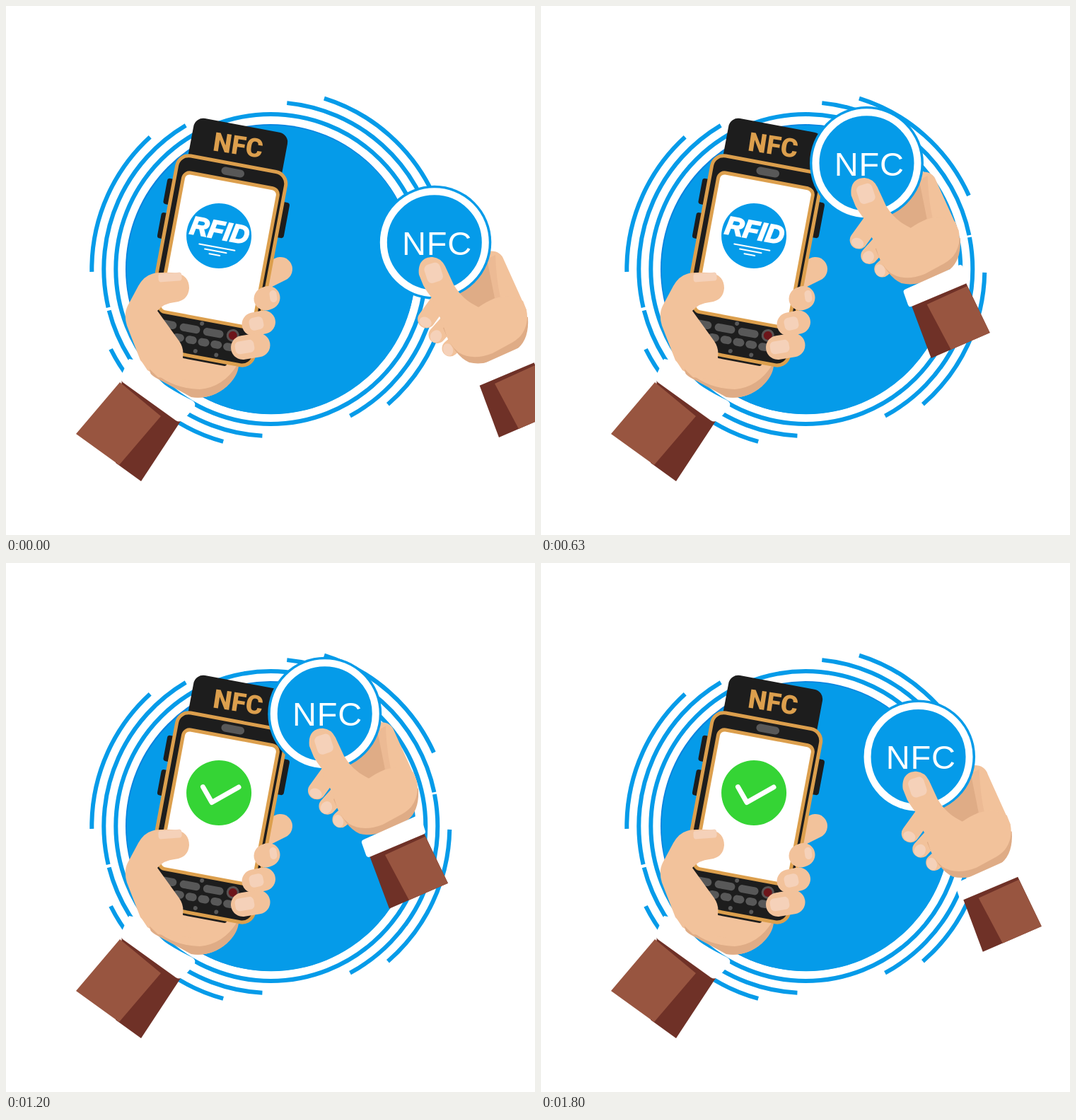
An HTML page that plays this animation: 748x748 px, repeating every 1.83 s.

```html
<!DOCTYPE html>
<html lang="en">
<head>
<meta charset="utf-8">
<title>NFC tap</title>
<style>
  html, body { margin: 0; width: 100%; height: 100%; overflow: hidden; background: #fff; }
  svg { display: block; width: 100vw; height: 100vh; }
  .blue { fill: #059be9; }
  .rings { fill: none; stroke: #059be9; stroke-width: 6; }
  .skin { fill: #f2c29b; }
  .tip { stroke: #f2c29b; stroke-linecap: round; }
  .shade { fill: #dfac86; }
  .nail { fill: #f5d1b9; }
  .ink { fill: #1d1d1d; }
  .gold { stroke: #dc9f4d; stroke-width: 5; }
  .key { fill: #585858; }
  .keys { stroke: #585858; stroke-width: 11; stroke-linecap: round; }
  .white { fill: #fff; }
  .cloth { fill: #985540; }
  .dark { fill: #6f3127; }
  .line { fill: none; stroke: #fff; stroke-linecap: round; stroke-linejoin: round; }
  text { font-family: "Liberation Sans", Arial, sans-serif; }
</style>
</head>
<body>
<svg viewBox="0 0 748 748">
  <!-- broken rings: dashes and gaps in degrees -->
  <g class="rings" transform="translate(374.300 372)">
    <circle r="219"/>
    <circle r="236" pathLength="360" transform="rotate(-11)" stroke-dasharray="72.600 31.300 72.700 1.100 72.700 36.200 72.700 .7"/>
    <circle r="253" pathLength="360" transform="rotate(1.100)" stroke-dasharray="48 56.300 48 25.700 48.500 59.800 48.300 25.400"/>
  </g>
  <circle cx="374" cy="372" r="205" fill="#0783df"/>
  <circle class="blue" cx="374.8" cy="373" r="204.2"/>

  <!-- palm and index finger behind the phone -->
  <path class="skin" d="M190 500L250 480L329 498Q331 520 312 538Q290 557 262 553L200 515Z"/>
  <path class="shade" d="M202 510Q230 541 274 542Q309 539 329 504Q330 522 312 538Q290 557 262 553L205 522Z"/>
  <path class="tip" stroke-width="34" d="M360 386L388 372"/>

  <!-- phone, upright in its own tilted frame -->
  <g transform="rotate(10.600)">
    <g class="ink">
      <rect x="292" y="104.500" width="135" height="70" rx="14"/>
      <rect x="269.500" y="197" width="14" height="37" rx="4"/>
      <rect x="270" y="246" width="14" height="37" rx="4"/>
      <rect x="432" y="200" width="14" height="51" rx="4"/>
      <rect x="300" y="425" width="100" height="18.500" rx="3"/>
    </g>
    <rect class="ink gold" x="279" y="160.300" width="156.500" height="278" rx="17"/>
    <rect class="white gold" x="291" y="184" width="136" height="200" rx="9"/>
    <text transform="translate(359 133) rotate(-2)" text-anchor="middle" y="13"
      style="font:800 37px Roboto,sans-serif" fill="#dc9f4d">NFC</text>
    <rect class="key" x="342" y="166.500" width="33" height="11" rx="5.500"/>
    <path class="keys" stroke-dasharray="18 15.700" d="M296.800 400.400H382.500"/>
    <path class="keys" stroke-dasharray="5 13.100" d="M323.500 416H402"/>
    <g class="key">
      <circle cx="355" cy="390.300" r="3"/><circle cx="353" cy="430.400" r="3"/><circle cx="383" cy="430.400" r="3"/>
    </g>
    <circle cx="401" cy="399" r="7.500" fill="#6d151a" stroke="#595353" stroke-width="3"/>

    <g id="idle">
      <circle class="blue" cx="355.700" cy="264" r="46"/>
      <text x="355.500" y="268.500" text-anchor="middle" font-size="36" font-weight="bold"
        font-style="italic" fill="#fff" stroke="#fff" stroke-width="2">RFID</text>
      <path class="line" stroke-width="2" d="M330.500 280.400h51M339.500 286h31M347 291.400h15"/>
    </g>
    <g id="done">
      <circle cx="355.700" cy="264" r="46" fill="#35d435"/>
      <path class="line" stroke-width="7" d="M332 260L348.300 279.200L381.700 251"/>
    </g>
  </g>

  <!-- left hand in front of the phone -->
  <path class="skin" d="M206 379Q213 376 235 377C252 378 259 386 259 399C258 412 250 418 238 419Q224 420 214 431L245 474Q252 484 250 497L262 530L215 525L190 501L171 452Q166 436 172 424L187 396Q195 382 206 379Z"/>
  <rect class="nail" x="215.500" y="377.500" width="33" height="12" rx="4" transform="rotate(-4 232 383.500)"/>
  <g class="tip">
    <path stroke-width="33" d="M367 414L371 412.500"/>
    <path stroke-width="33" d="M350 450L364.500 447"/>
    <path stroke-width="34" d="M335 483L356.500 479.500"/>
  </g>
  <g class="nail">
    <rect x="373" y="402" width="10" height="17" rx="5" transform="rotate(-8 378 411)"/>
    <rect x="344" y="440" width="20" height="18" rx="6" transform="rotate(-12 354 449)"/>
    <rect x="324" y="473" width="27" height="18" rx="6" transform="rotate(-10 338 482)"/>
  </g>
  <path class="dark" d="M164 526L247 587L191 672L155 646Z"/>
  <path class="cloth" d="M161 532L219 580L160 649L99 605Z"/>
  <path class="white" d="M174 499Q186 500 195 511Q220 537 262 557Q270 561 266 568L252 584Q246 590 240 586L165 532Q161 528 163 522Z"/>

  <!-- right hand with the tag -->
  <g id="tag">
    <path class="skin" d="M675 348Q698 342 704 359L736 430L712 450L640 425L640 400Z"/>
    <path fill="#ecba94" d="M676 360L692 352Q693 385 699 412L668 426Z"/>
    <path class="shade" d="M681 363L691 413L668 426L636 408Z"/>
    <g class="blue" transform="translate(605.800 334.300)">
      <circle r="80.500"/>
      <circle r="72" stroke="#fff" stroke-width="10"/>
    </g>
    <text x="560" y="351.500" font-size="47" letter-spacing=".8" fill="#fff">NFC</text>
    <g class="tip">
      <path stroke-width="25" d="M614 416L594.500 443"/>
      <path stroke-width="24" d="M632 440L609.500 465"/>
      <path stroke-width="23" d="M648 466L628 484"/>
    </g>
    <g class="nail">
      <ellipse cx="593" cy="447" rx="9" ry="7" transform="rotate(25 593 447)"/>
      <ellipse cx="608" cy="467" rx="8" ry="9" transform="rotate(30 608 467)"/>
      <ellipse cx="625" cy="486" rx="7" ry="9" transform="rotate(-20 625 486)"/>
    </g>
    <path class="shade" d="M618 455Q634 495 655 504Q675 509 700 497L724 484Q740 470 738 440L700 430Z"/>
    <path class="skin" d="M584 380C582 363 590 355 603 355Q615 356 621 368L633 394Q645 415 668 426Q690 410 712 410L731 417L736 430Q740 450 728 466Q722 473 710 479L688 491Q660 502 640 490Q625 478 620 457Q616 440 605 428L604 415Q595 404 590 395Z"/>
    <rect class="nail" x="593" y="364" width="23" height="27" rx="7" transform="rotate(-18 604 377)"/>
    <path class="dark" d="M669 535L745 501L780 574L697 610Z"/>
    <path class="cloth" d="M691 534L748 508L780 574L725 598Z"/>
    <path d="M662 516L668 533L744 501L738 482Z" fill="#fff" stroke="#fff" stroke-width="8" stroke-linejoin="round"/>
  </g>
</svg>
<script>
  const [tag, idle, done] = ['tag', 'idle', 'done'].map(id => document.getElementById(id));
  const STEP = 30, LOOP = 1830, TAP = 29;

  // The tag glides in at full speed, touches, then leaves more slowly
  function draw() {
    const n = Math.floor(performance.now() % LOOP / STEP);
    const back = n - TAP;
    const touched = back >= 0;
    const [x, y] = touched ? [4.14 * back - 200.6, 3.04 * back - 154.6] : [-6.92 * n, -5.33 * n];
    tag.setAttribute('transform', `translate(${x} ${y})`);
    idle.style.display = touched ? 'none' : '';
    done.style.display = touched ? '' : 'none';
    requestAnimationFrame(draw);
  }
  draw();
</script>
</body>
</html>
```
